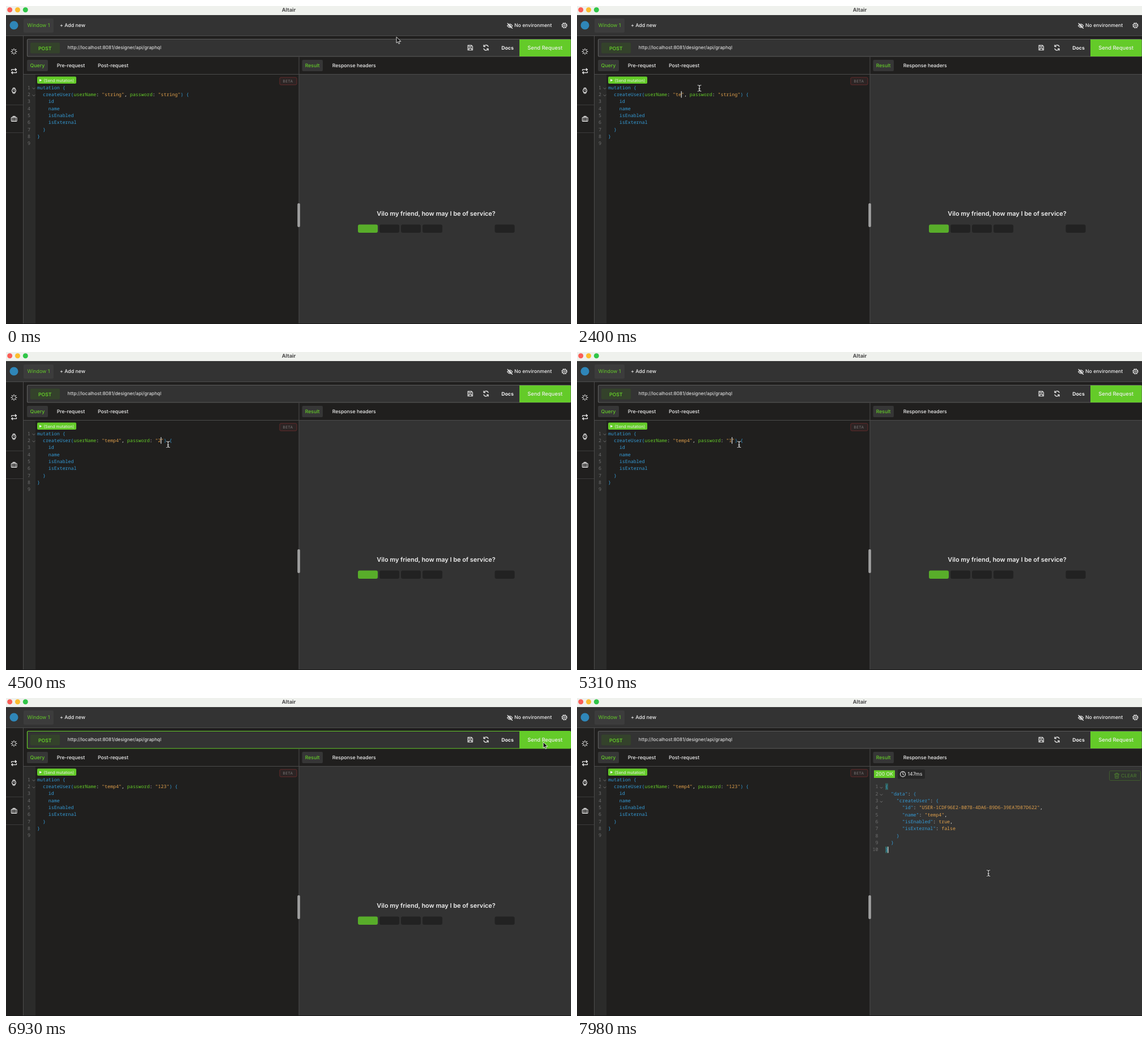
An HTML page for the animation above (8000 ms loop, 997x561 px).

```html
<!DOCTYPE html>
<html lang="en">
<head>
<meta charset="utf-8">
<title>Altair</title>
<style>
  html, body { margin: 0; width: 100%; height: 100%; overflow: hidden; background: #201f1e; }
  svg { display: block; width: 100vw; height: 100vh; }
  text { font-family: Inter, "Open Sans", sans-serif; white-space: pre; text-rendering: geometricPrecision; }
  .code { font-family: "Noto Sans Mono", "DejaVu Sans Mono", monospace; font-size: 8.28px; }
</style>
</head>
<body>
<svg id="stage" viewBox="0 0 997 561"></svg>
<script>
const LOOP = 8000;
const GREEN = '#64cb29', BLUE = '#349bd6', AMBER = '#e0a04c', WHITE = '#f0f0f0';
const PANEL = '#333333', DARK = '#201f1e', LINE = '#4c4c4c', DIM = '#6f6f6f';
const CHAR = 4.968, ROW = 12.36;
const stage = document.getElementById('stage');

function add(tag, attrs, parent = stage) {
  const el = document.createElementNS('http://www.w3.org/2000/svg', tag);
  for (const key in attrs) el.setAttribute(key, attrs[key]);
  return parent.appendChild(el);
}
const group = (parent = stage) => add('g', {}, parent);
const rect = (x, y, width, height, fill, more = {}, parent) =>
  add('rect', { x, y, width, height, fill, ...more }, parent);
const path = (d, more = {}, parent) =>
  add('path', { d, fill: 'none', stroke: WHITE, 'stroke-width': 1, 'stroke-linecap': 'round', 'stroke-linejoin': 'round', ...more }, parent);
const circle = (cx, cy, r, more = {}, parent) => add('circle', { cx, cy, r, ...more }, parent);
function label(x, y, words, size = 8.75, fill = WHITE, more = {}, parent) {
  const el = add('text', { x, y, fill, 'font-size': size, ...more }, parent);
  el.textContent = words;
  return el;
}

// Tokens are [text, colour] pairs laid out one after another.
function setCode(el, tokens) {
  el.textContent = '';
  for (const [words, fill] of tokens) add('tspan', { fill }, el).textContent = words;
}
function codeLine(x, y, tokens, parent) {
  const el = add('text', { x, y, class: 'code' }, parent);
  setCode(el, tokens);
  return el;
}
function gutter(x, y, count, parent) {
  for (let i = 0; i < count; i++)
    add('text', { x, y: y + i * ROW, class: 'code', fill: DIM, 'text-anchor': 'end' }, parent).textContent = i + 1;
}
const fold = (x, y, parent) => path(`M${x - 2} ${y - 1}l2 2l2 -2`, { stroke: '#777', 'stroke-width': 0.9 }, parent);
const show = (el, on) => el.setAttribute('visibility', on ? 'visible' : 'hidden');

// Window bar and header
rect(0, 0, 997, 561, DARK);
rect(0, 0, 997, 16, '#eff1ed');
['#fa5f58', '#fbbd2e', '#30c648'].forEach((fill, i) => circle(6.7 + i * 13.8, 6.7, 4.5, { fill }));
label(499, 10, 'Altair', 9.2, '#494949', { 'font-weight': 700, 'text-anchor': 'middle' });
rect(0, 16, 997, 36, PANEL);
rect(0, 52, 997, 1, LINE);
circle(14, 34, 7.5, { fill: '#2f86b8' });
rect(31, 22, 53, 25, '#3c3c3c', { rx: 2 });
label(37.5, 37, 'Window 1', 8.8, GREEN);
label(95, 37, '+ Add new', 8.75, WHITE, { 'font-weight': 500 });
label(897, 37.2, 'No environment', 8.7, WHITE, { 'font-weight': 500 });
path('M884.5 35Q889 28.5 893.7 35Q889 41 884.5 35M885 30.5L893.5 39.5', { 'stroke-width': 1.1 });
circle(889, 35, 1.6, { fill: 'none', stroke: WHITE });
circle(985.4, 34.3, 3.7, { fill: 'none', stroke: WHITE, 'stroke-width': 1.2 });
circle(985.4, 34.3, 1.5, { fill: 'none', stroke: WHITE });
circle(985.4, 34.3, 4.6, { fill: 'none', stroke: WHITE, 'stroke-width': 1.1, 'stroke-dasharray': '1.8 1.81' });

// Sidebar
rect(30, 53, 1, 508, LINE);
rect(0, 174, 30, 1, '#3c3c3c');
rect(0, 223, 30, 1, '#3c3c3c');
for (let i = 0; i < 8; i++)
  path('M14 77.5V75.3', { transform: `rotate(${i * 45} 14 80.3)`, 'stroke-width': 1.2 });
path('M9.7 114V112.2H18.3M16.3 110.2L18.5 112.2L16.3 114.2M18.5 115.6V117.6H9.7M11.8 115.6L9.6 117.6L11.8 119.6', { 'stroke-width': 1.2 });
circle(14, 149.3, 3.3, { fill: 'none', stroke: WHITE, 'stroke-width': 1.2 });
path('M12 146.2L12.4 144.4H15.6L16 146.2M12 152.4L12.4 154.2H15.6L16 152.4M14 148V149.4L15 149.8');
rect(9.4, 196.2, 9.6, 7.2, 'none', { rx: 1, stroke: WHITE, 'stroke-width': 1.1 });
path('M12.3 203V194.6H16V203', { 'stroke-width': 1.1 });

// Address bar
const urlBox = rect(37.5, 58.5, 959, 30.5, PANEL, { rx: 2, 'stroke-width': 1.2 });
rect(43, 64.5, 52, 19, '#34422b', { rx: 2 });
label(57, 77.5, 'POST', 8.7, GREEN, { 'font-weight': 600 });
label(108.8, 75.7, 'http://localhost:8081/designer/api/graphql', 8.3);
path('M815 69.2H821.3L823.4 71.3V77.8H815ZM817 69.4V71.8H820.8V69.4M816.8 77.6V74.4H821.6V77.6', { 'stroke-width': 1.1 });
path('M851 71.6A4.2 4.2 0 0 0 843.3 71.2M843 68.8V71.6H845.6M843 75.2A4.2 4.2 0 0 0 850.7 75.8M851 78.2V75.4H848.4', { 'stroke-width': 1.2 });
label(874.2, 76.5, 'Docs', 8.7, WHITE, { 'font-weight': 700 });
rect(906, 59, 90.5, 30, GREEN);
label(951, 76.8, 'Send Request', 9.3, WHITE, { 'text-anchor': 'middle', 'font-weight': 500 });

// Left pane
rect(37, 95, 37, 20, '#363636', { rx: 2 });
label(42.5, 108, 'Query', 8.75, GREEN, { 'font-weight': 500 });
label(89.7, 108, 'Pre-request', 8.7, WHITE, { 'font-weight': 500 });
label(162, 108, 'Post-request', 8.7, WHITE, { 'font-weight': 500 });
rect(31, 121, 21, 440, '#2b2b2a');
rect(31, 120, 486, 1, LINE);
rect(55, 124.5, 69, 12.5, GREEN, { rx: 2 });
path('M59 128.8L63.4 131L59 133.2Z', { fill: WHITE, stroke: 'none' });
label(66.5, 133.5, '(Send mutation)', 7.1);
rect(483, 126, 30, 13, '#2c2424', { rx: 2, stroke: '#692b2b', 'stroke-width': 0.9 });
label(488.6, 135.3, 'BETA', 6.6, '#777', { 'letter-spacing': 0.3 });
gutter(43, 146.5, 9);
fold(49, 145.5);
fold(49, 157.8);
const wordMark = rect(0, 150, CHAR * 6, ROW, '#d7d4f0');
const editY = n => 146.6 + (n - 1) * ROW;
['mutation {', '', '    id', '    name', '    isEnabled', '    isExternal', '  }', '}']
  .forEach((words, i) => codeLine(55, editY(i + 1), [[words, BLUE]]));
const callLine = codeLine(55, editY(2), []);
const caret = rect(0, 150.3, 1, 11.5, '#fff');

// Right pane
rect(517, 121, 480, 440, PANEL);
rect(517, 120, 480, 1, LINE);
rect(522.5, 95, 36.5, 20, '#363636', { rx: 2 });
label(527.7, 108, 'Result', 8.7, GREEN, { 'font-weight': 500 });
label(575.7, 108, 'Response headers', 8.7, WHITE, { 'font-weight': 500 });

const welcome = group();
label(759, 370, 'Vilo my friend, how may I be of service?', 10.9, WHITE, { 'font-weight': 600, 'text-anchor': 'middle' }, welcome);
[621, 659, 697, 735, 862.5].forEach((x, i) =>
  rect(x, 385.5, 35, 14.5, i ? '#222' : '#58ad2a', { rx: 3 }, welcome));

const result = group();
rect(524, 127.5, 37, 13.5, GREEN, {}, result);
label(527, 137.4, '200 OK', 8.6, WHITE, {}, result);
rect(566, 126, 48, 16.5, '#262626', { rx: 2 }, result);
circle(575, 134.4, 4.5, { fill: 'none', stroke: WHITE, 'stroke-width': 1.1 }, result);
path('M575 131.8V134.6L576.8 135.6', {}, result);
label(583.5, 137.4, '147ms', 8.7, WHITE, {}, result);
rect(939.5, 128.5, 55, 17, '#313630', { rx: 2, stroke: '#42602f', 'stroke-width': 0.9 }, result);
path('M948.3 134.3H956.7M950.8 134V132.6H954.2V134M949.3 134.5L949.8 141.6H955.2L955.7 134.5M951.5 136.5V139.6M953.5 136.5V139.6', { stroke: '#4d7d31' }, result);
label(960, 140, 'CLEAR', 8.5, '#4d7d31', {}, result);
gutter(531.5, 159.2, 10, result);
[1, 2, 3].forEach(n => fold(537, 146 + n * ROW, result));
const allMark = path('M544 150.5H997V262H549V273.5H544Z', { fill: '#d9d9d9', stroke: 'none' }, result);
for (const y of [150.5, 262]) rect(544, y, 5, 11.5, '#328c82', { opacity: 0.5 }, result);
const field = (key, value, end = ',') =>
  [[`      "${key}"`, BLUE], [': ', WHITE], [value, AMBER], [end, WHITE]];
const open = (indent, key) => [[`${indent}"${key}"`, BLUE], [': ', WHITE], ['{', BLUE]];
[
  [['{', BLUE]],
  open('  ', 'data'),
  open('    ', 'createUser'),
  field('id', '"USER-1CDF96E2-B07B-4DA6-B9D6-39EA7D87D622"'),
  field('name', '"temp4"'),
  field('isEnabled', 'true'),
  field('isExternal', 'false', ''),
  [['    }', BLUE]],
  [['  }', BLUE]],
  [['}', BLUE]]
].forEach((tokens, i) => codeLine(544, 159.2 + i * ROW, tokens, result));
const endCaret = rect(548.4, 262.3, 1, 11, '#fff', {}, result);

// Splitter and lower edge
rect(516.5, 90, 1, 471, LINE);
rect(514.3, 348, 4.6, 42, '#a0a0a0', { rx: 2 });
rect(0, 560, 997, 1, '#191919');

// Pointer
const pointer = group();
const arrow = path('M0 0V10.2L2.4 8L4 11.8L5.8 11L4.1 7.4H7.4Z', { fill: '#111', 'stroke-width': 0.9 }, pointer);
const beam = group(pointer);
const beamShape = 'M-3 -5.3Q0 -5.3 0 -3.6Q0 -5.3 3 -5.3M0 -3.6V3.6M-3 5.3Q0 5.3 0 3.6Q0 5.3 3 5.3M-1.4 1H1.4';
path(beamShape, { stroke: '#111', 'stroke-width': 2.6 }, beam);
path(beamShape, { 'stroke-width': 1.1 }, beam);
const ring = group(pointer);
circle(0, 0, 11.7, { fill: 'none', stroke: '#fff', 'stroke-width': 1.4 }, ring);
circle(0, 0, 8.7, { fill: 'none', stroke: '#fff', 'stroke-width': 1.2 }, ring);

const route = [
  [20, 689, 55], [810, 195, 157], [1620, 195, 157], [2200, 216, 145], [3480, 216, 145],
  [3960, 286, 161], [4400, 286, 163], [5350, 286, 163], [5740, 372, 206], [6000, 372, 206],
  [6120, 409, 215], [6700, 948, 78], [6930, 948, 78], [7350, 787, 296], [7600, 732, 308], [7680, 726, 309]
];
const clicks = [[900, 1060], [1120, 1280], [3990, 4110], [4150, 4260], [6770, 6900], [7860, 7965]];
const nameSteps = [[0, 'string'], [1680, 't'], [2130, 'te'], [2580, 'tem'], [2790, 'temp'], [3090, 'temp4']];
const passSteps = [[0, 'string'], [4380, '2'], [4740, ''], [5190, '1'], [5430, '12'], [5700, '123']];
const SENT = 6780, ANSWER = 7020, REFOCUS = 7890;

const latest = (steps, t) => steps.filter(s => s[0] <= t).pop();
const within = (t, [from, to]) => t >= from && t < to;

function position(t) {
  const next = route.findIndex(k => k[0] > t);
  if (next === 0) return route[0].slice(1);
  if (next < 0) return route[route.length - 1].slice(1);
  const [t0, x0, y0] = route[next - 1], [t1, x1, y1] = route[next];
  const p = (t - t0) / (t1 - t0), e = p * p * (3 - 2 * p);
  return [x0 + (x1 - x0) * e, y0 + (y1 - y0) * e];
}

let lastCall = '';
function drawEditor(t) {
  const [nameTime, name] = latest(nameSteps, t);
  const [passTime, pass] = latest(passSteps, t);
  const call = name + '|' + pass;
  if (call !== lastCall) {
    lastCall = call;
    setCode(callLine, [
      ['  createUser(', BLUE], ['userName', GREEN], [': ', WHITE], [`"${name}"`, AMBER], [', ', WHITE],
      ['password', GREEN], [': ', WHITE], [`"${pass}"`, AMBER], [') {', BLUE]
    ]);
  }
  const inPass = t >= 3990;
  const column = inPass ? 38 + name.length : 24;
  const word = inPass ? pass : name;
  const start = 55 + column * CHAR;
  wordMark.setAttribute('x', start);
  show(wordMark, within(t, [1120, 1680]) || within(t, [4150, 4380]));
  caret.setAttribute('x', start + word.length * CHAR - 0.5);
  const since = t - Math.max(900, nameTime, inPass ? Math.max(passTime, 3990) : 0);
  show(caret, within(t, [900, SENT]) && Math.floor(since / 600) % 2 === 0);
}

function draw(t) {
  drawEditor(t);
  show(welcome, t < ANSWER);
  show(result, t >= ANSWER);
  allMark.setAttribute('display', t < REFOCUS ? 'inline' : 'none');
  endCaret.setAttribute('display', t < REFOCUS ? 'none' : 'inline');
  urlBox.setAttribute('stroke', within(t, [SENT, REFOCUS + 30]) ? GREEN : '#5c5c5c');

  const [x, y] = position(t);
  pointer.setAttribute('transform', `translate(${x.toFixed(2)} ${y.toFixed(2)})`);
  const overText = (x > 52 && x < 514 && y > 121) || (x > 520 && y > 150) ||
    (x > 100 && x < 800 && y > 60 && y < 88);
  show(arrow, !overText);
  show(beam, overText);
  show(ring, clicks.some(c => within(t, c)));
}

const begin = performance.now();
function tick() {
  draw((performance.now() - begin) % LOOP);
  requestAnimationFrame(tick);
}
draw(0);
requestAnimationFrame(tick);
</script>
</body>
</html>
```
